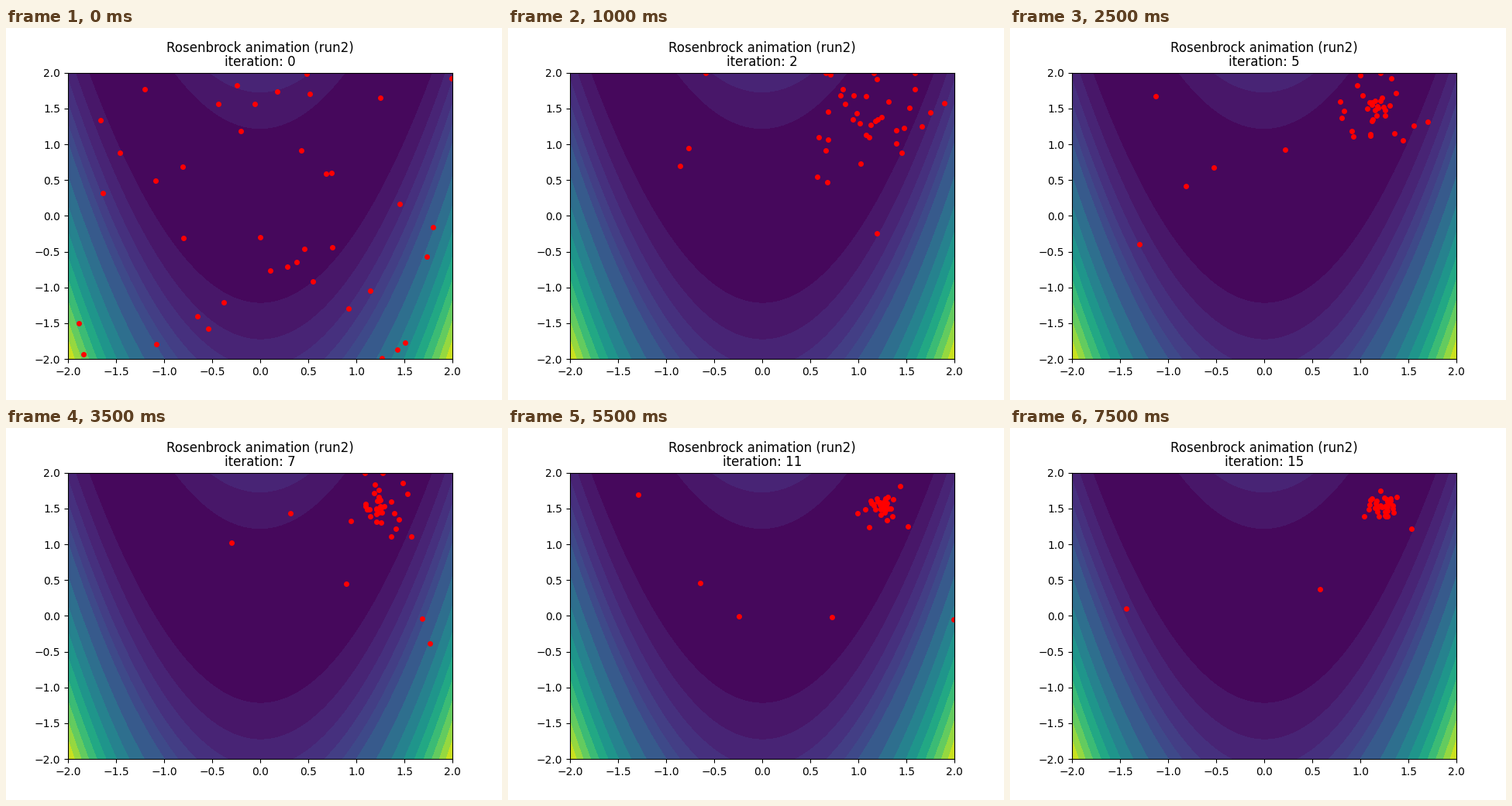
Recreate the animation shown at these times as a matplotlib script. Size 640 by 480 pixels, loop 8000 ms.

```python
import matplotlib.pyplot as plt
import numpy as np
from matplotlib.animation import FuncAnimation

STEPS, SWARM, STRAYS, STEP_MS = 16, 40, 5, 500
LIM = 2.0
BEST = np.array([1.24, 1.52])


def rosenbrock(x, y):
    return (1 - x) ** 2 + 100 * (y - x ** 2) ** 2


def positions(k):
    """Particles at iteration k: a shrinking swarm plus a few strays."""
    rng = np.random.default_rng(k)
    if k == 0:
        return rng.uniform(-LIM, LIM, (SWARM, 2))
    n = SWARM - STRAYS
    center = BEST - .9 * np.exp(-k)
    spread = .06 + .42 * np.exp((2 - k) / 4)
    reach = spread * rng.uniform(.3, 1.5, (n, 1))
    core = center + rng.standard_normal((n, 2)) * reach * (1, 1.1)
    strays = rng.uniform((-1.5, -.4), (LIM, LIM), (STRAYS, 2))
    return np.clip(np.vstack([core, strays]), -LIM, LIM)


fig, ax = plt.subplots(figsize=(6.4, 4.8), dpi=100)
grid = np.linspace(-LIM, LIM, 100)
X, Y = np.meshgrid(grid, grid)
# Fine bands in the valley, coarse ones on the slopes
levels = np.r_[0:900:150, 900:3601:300, 3750]
ax.contourf(X, Y, rosenbrock(X, Y), levels=levels)
dots, = ax.plot([], [], "ro", ms=4)
ax.set_xlim(-LIM, LIM)
ax.set_ylim(-LIM, LIM)


def update(k):
    dots.set_data(*positions(k).T)
    ax.set_title(f"Rosenbrock animation (run2)\niteration: {k}", linespacing=1)
    return (dots,)


anim = FuncAnimation(fig, update, frames=STEPS, interval=STEP_MS,
                     repeat=True, repeat_delay=0)
plt.show()
```
